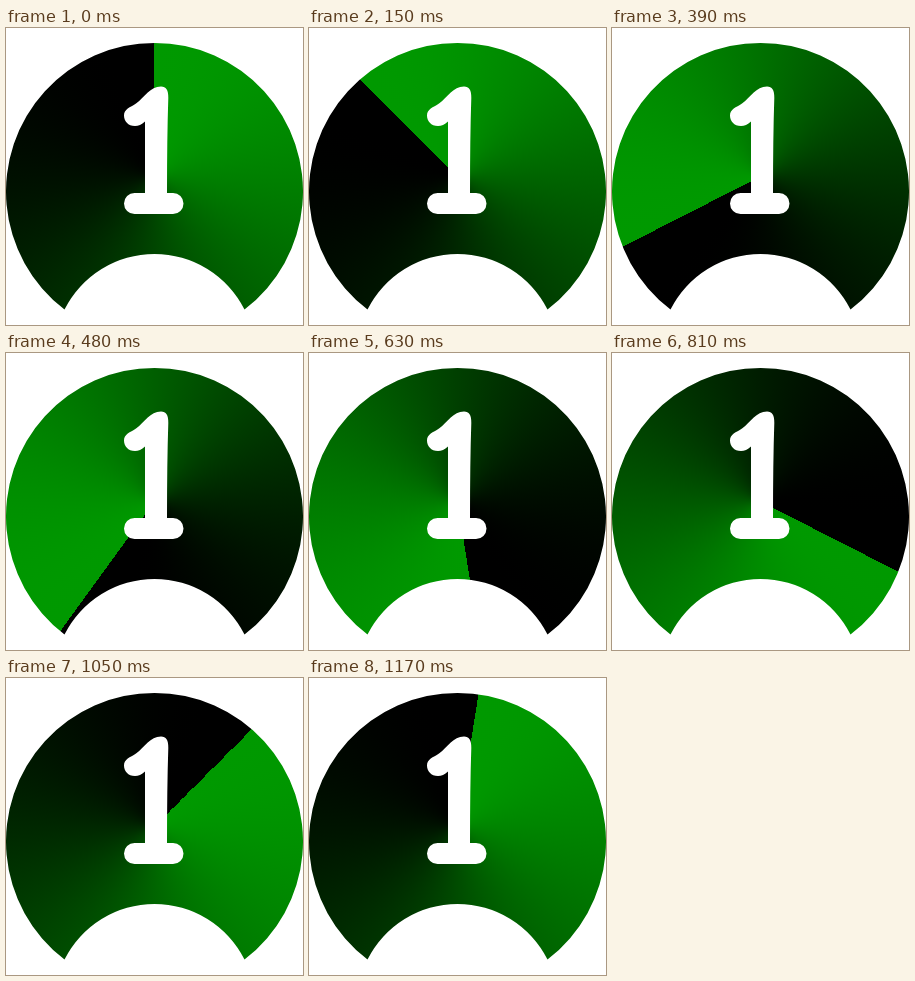
Recreate the animation shown at these times as an HTML page. Size 297 px wide and 297 px high, loop 1200 ms.

```html
<!DOCTYPE html>
<html lang="en">
<head>
<meta charset="utf-8">
<title>Rotating sweep</title>
<style>
  html, body { margin: 0; width: 100%; height: 100%; overflow: hidden; background: #fff; }
  .stage { position: relative; width: 297px; height: 297px; }
  #dial, svg { position: absolute; inset: 0; width: 297px; height: 297px; }
  #dial { clip-path: path("M58.5 281.5 A148.5 148.5 0 1 1 238.5 281.5 A100.7 100.7 0 0 0 58.5 281.5 Z"); }
</style>
</head>
<body>
<div class="stage">
  <div id="dial"></div>
  <svg viewBox="0 0 297 297" role="img" aria-label="1">
    <path fill="#fff" d="M139 93.5 Q134 98 129 98 C122 98 118 93 118 87.5
      C118 81 124 79.5 130 75.5 C139 69 144 58.5 155 58.5 C160 58.5 162.5 62 162.3 70
      Q161 110 161 165 H167 A10.5 10.5 0 0 1 167 186
      H128.5 A10.5 10.5 0 0 1 128.5 165 H139 Z"/>
  </svg>
</div>
<script>
  const LOOP = 1200, STEP = 30, TURN = 9;
  const GREEN = 153, FADE = 340;
  const dial = document.getElementById('dial');

  // Green falls along half a cosine, clockwise from the bright edge
  const level = deg => GREEN * (1 + Math.cos(Math.PI * deg / FADE)) / 2;
  const stops = [];
  for (let deg = 0; deg <= FADE; deg += 10) {
    stops.push(`rgb(0,${level(deg).toFixed(1)},0) ${deg}deg`);
  }
  const fade = stops.join(',');
  let last = -1;

  function draw(ms) {
    const step = Math.floor((ms % LOOP) / STEP);
    if (step === last) return;
    last = step;
    dial.style.background =
      `conic-gradient(from ${-step * TURN}deg at 148.5px 148.5px, ${fade})`;
  }

  const start = performance.now();
  function tick() {
    draw(performance.now() - start);
    requestAnimationFrame(tick);
  }
  tick();
</script>
</body>
</html>
```
